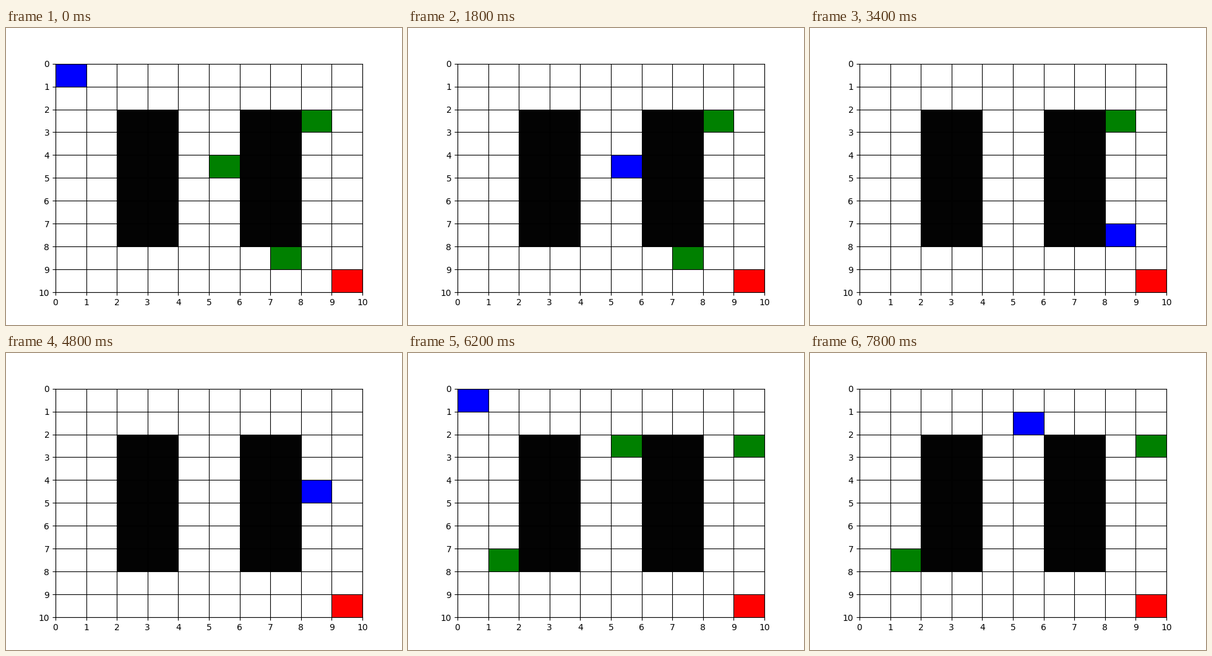
These frames come from a looping animation (640x480 px, 8000 ms). A matplotlib script:

```python
import matplotlib.pyplot as plt
from matplotlib.animation import FuncAnimation
from matplotlib.patches import Rectangle

STEP_MS = 200
MOVES = {"R": (1, 0), "L": (-1, 0), "D": (0, 1), "U": (0, -1)}

# Each run: the moves from the top-left cell and the cells to collect.
RUNS = [
    ("RDRRRR" + "D" * 7 + "RRR" + "U" * 6 + "DD" + "DDDRDD",
     [(5, 4), (7, 8), (8, 2)]),
    ("RDRRRRDU", [(5, 2), (1, 7), (9, 2)]),
]


def walk(moves):
    x = y = 0
    path = [(x, y)]
    for move in moves:
        dx, dy = MOVES[move]
        x, y = x + dx, y + dy
        path.append((x, y))
    return path


def build_states():
    states = []
    for moves, goals in RUNS:
        path = walk(moves)
        for i, cell in enumerate(path):
            left = [g for g in goals if g not in path[:i + 1]]
            states.append((cell, left))
    return states


states = build_states()

fig, ax = plt.subplots(figsize=(6.4, 4.8), dpi=100)
ax.set_xlim(0, 10)
ax.set_ylim(10, 0)
ax.set_xticks(range(11))
ax.set_yticks(range(11))
ax.set_axisbelow(False)
ax.grid(color="black", linewidth=0.8)


def add_block(x, y, color, w=1, h=1, zorder=1):
    block = Rectangle((x, y), w, h, facecolor=color, linewidth=0, zorder=zorder)
    return ax.add_patch(block)


for wall_x in (2, 6):
    add_block(wall_x, 2, "#030303", 2, 6)
add_block(9, 9, "red")
goal_blocks = [add_block(0, 0, "green") for _ in range(3)]
agent = add_block(0, 0, "blue", zorder=1.2)


def update(i):
    cell, left = states[i]
    agent.set_xy(cell)
    for k, block in enumerate(goal_blocks):
        block.set_visible(k < len(left))
        if k < len(left):
            block.set_xy(left[k])
    return [agent, *goal_blocks]


anim = FuncAnimation(fig, update, frames=len(states), interval=STEP_MS,
                     init_func=lambda: update(0), repeat=True,
                     repeat_delay=0, blit=False)
plt.show()
```
